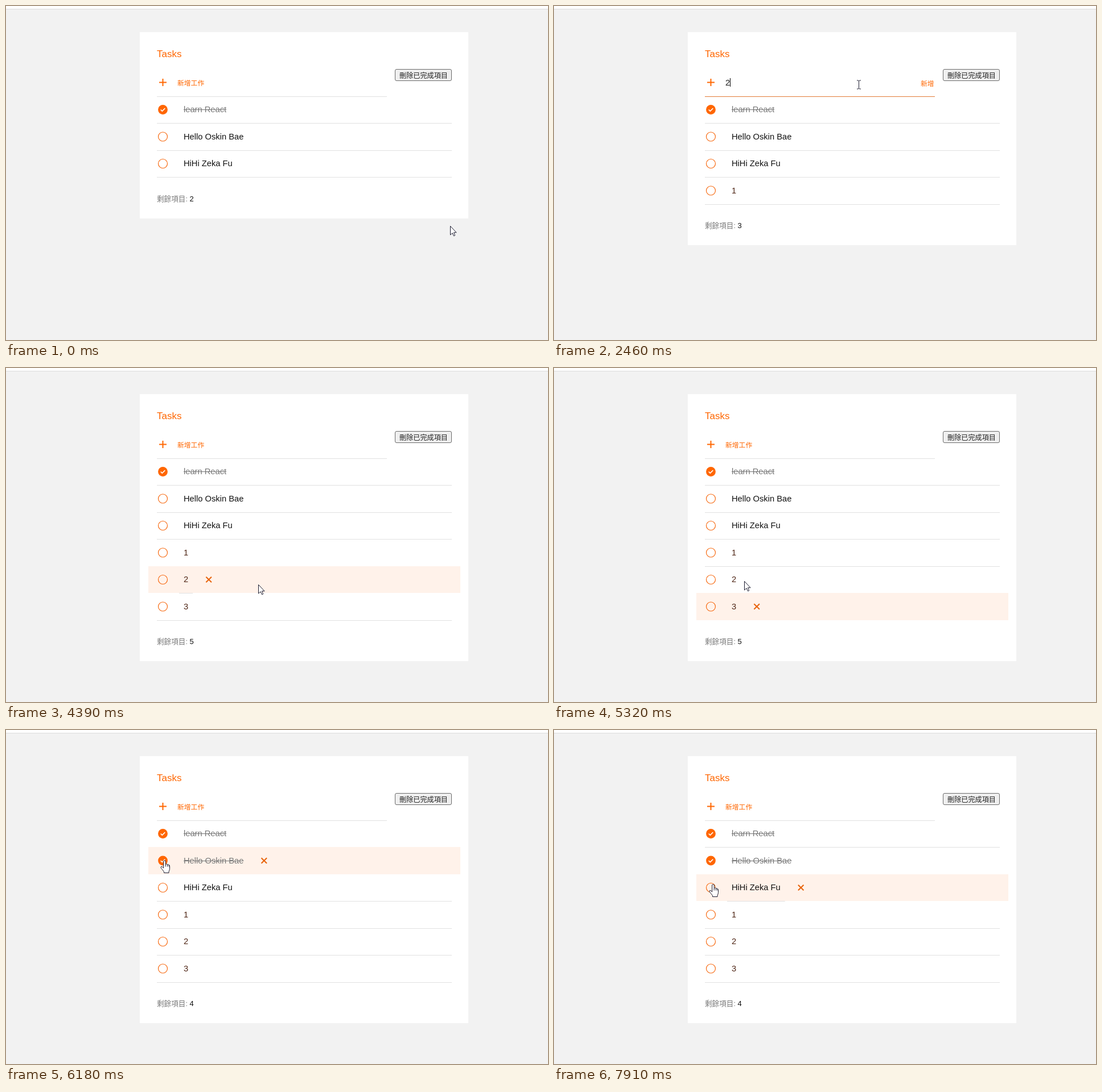
An HTML page with a canvas for the animation above (7.99 s loop, 952 px wide and 588 px high).

```html
<!DOCTYPE html>
<html lang="zh-Hant">
<head>
<meta charset="utf-8">
<title>Tasks</title>
<style>
html, body { margin: 0; width: 100%; height: 100%; overflow: hidden; background: #f2f2f2; }
canvas { display: block; }
</style>
</head>
<body>
<canvas id="stage" width="952" height="588"></canvas>
<script>
const ctx = document.getElementById('stage').getContext('2d');
const LOOP = 7990, ROW = 47.5, LIST_TOP = 159;
const TRAVEL = 200, HOVER_LAG = 80, TYPE_DELAY = 220;
const ORANGE = '#ff6600', LINE = '#e1e1e1';
const FONT = '"Liberation Sans", "Noto Sans CJK TC", "Noto Sans CJK", sans-serif';

// Times: the input gets focus, the task is added, the task is ticked off.
const tasks = [
  { label: 'learn React', added: 0, done: 0 },
  { label: 'Hello Oskin Bae', added: 0, done: 6100 },
  { label: 'HiHi Zeka Fu', added: 0 },
  { label: '1', focus: 930, added: 1600 },
  { label: '2', focus: 2230, added: 2770 },
  { label: '3', focus: 3080, added: 4010 }
];

// Pointer stops: arrival time and place. It sets off TRAVEL ms before it arrives.
const field = [616, 138], addButton = [655, 138];
const stops = [
  [0, 780, 387], [280, 560, 270], [480, 295, 136],
  [1300, ...field], [1580, ...addButton], [2080, 535, 138],
  [2700, ...addButton], [3000, ...field], [3540, 683, 133], [3980, ...addButton],
  [4330, 443, 381], [4670, 375, 500], [4950, 345, 440], [5390, 328, 340],
  [5640, 324, 242], [5980, 278, 229], [6790, 329, 365], [6960, 338, 482], [7850, 279, 271]
];

const arrow = new Path2D('M0 0V15.5L3.6 12.2 6 17.3 8.2 16.4 6 11.3H10.6Z');
const hand = new Path2D('M-1.8 1.2Q0-.8 1.8 1.2V7Q4 5.4 5 7.4 7 6.4 7.6 8.4 9 8 9 10V15' +
  'Q8.6 18 7.5 19.5V22H-1V20Q-4 16-6.5 13-6.8 10.5-4.5 11L-1.8 13.5ZM1.8 7V11M5 7.4V11M7.6 8.4V11');
const beam = new Path2D('M-3.5-7.5H-1L0-6.5 1-7.5H3.5M0-6.5V6.5M-3.5 7.5H-1L0 6.5 1 7.5H3.5');

function pointerAt(t) {
  let [x, y] = stops[0].slice(1);
  stops.forEach(([arrive, toX, toY], i) => {
    if (i === 0) return;
    const leave = Math.max(arrive - TRAVEL, stops[i - 1][0]);
    const k = Math.min(1, Math.max(0, (t - leave) / (arrive - leave)));
    x += (toX - x) * k;
    y += (toY - y) * k;
  });
  return [x, y];
}

const lineY = i => Math.floor(LIST_TOP + ROW * i);

function rect(x, y, w, h, color) {
  ctx.fillStyle = color;
  ctx.fillRect(x, y, w, h);
}

function text(str, x, y, size, color) {
  ctx.font = `${size}px ${FONT}`;
  ctx.fillStyle = color;
  ctx.fillText(str, x, y);
  return ctx.measureText(str).width;
}

function stroke(points, color, width) {
  ctx.beginPath();
  points.forEach(([x, y]) => ctx.lineTo(x, y));
  ctx.strokeStyle = color;
  ctx.lineWidth = width;
  ctx.stroke();
}

function checkbox(x, y, done) {
  ctx.beginPath();
  ctx.arc(x, y, done ? 8.4 : 8, 0, 7);
  if (done) {
    ctx.fillStyle = ORANGE;
    ctx.fill();
    stroke([[x - 3.8, y], [x - 1.2, y + 2.6], [x + 3.8, y - 2.4]], '#fff', 1.5);
  } else {
    ctx.strokeStyle = '#f76a12';
    ctx.lineWidth = 1.2;
    ctx.stroke();
  }
}

function drawForm(t) {
  const entry = tasks.find(task => t >= task.focus && t < task.added);
  stroke([[269, 134.5], [282, 134.5]], ORANGE, 2);
  stroke([[275.5, 128], [275.5, 141]], ORANGE, 2);
  rect(265, LIST_TOP, 404, 1, entry ? '#e27a36' : LINE);
  if (entry) {
    const typed = t >= entry.focus + TYPE_DELAY ? entry.label : '';
    const width = text(typed, 301, 140, 14.7, '#222');
    rect(Math.round(301 + width), 127, 1, 15, '#000');
    text('新增', 644, 141, 11.8, ORANGE);
  } else {
    text('新增工作', 301, 140, 11.8, ORANGE);
  }
  ctx.beginPath();
  ctx.roundRect(683.5, 111.5, 99, 20, 2.5);
  ctx.fillStyle = '#efefef';
  ctx.fill();
  ctx.strokeStyle = '#6b6b6b';
  ctx.lineWidth = 1;
  ctx.stroke();
  text('刪除已完成項目', 691, 127, 12.15, '#222');
}

function drawTask({ label, done }, i, hovered, t) {
  const left = 312, top = lineY(i), bottom = lineY(i + 1), mid = 182.5 + ROW * i;
  const isDone = t >= done;
  if (hovered) rect(250, top, 548, bottom - top, '#fff2ea');
  else rect(265, bottom, 518, 1, LINE);
  checkbox(275.5, mid, isDone);
  const color = isDone ? '#777' : label.length > 1 ? '#111' : '#4f2616';
  const width = text(label, left, Math.floor(mid + 5.3), 14.7, color);
  if (isDone) rect(left, Math.floor(mid), width, 1, '#777');
  if (!hovered) return;
  // Even rows end on a half pixel, which leaves a hairline below the label.
  if (i % 2 === 0) rect(left - 8, bottom, width + 16, 1, LINE);
  const x = left + width + 36, r = 4.8;
  stroke([[x - r, mid - r], [x + r, mid + r]], '#e8640c', 2);
  stroke([[x + r, mid - r], [x - r, mid + r]], '#e8640c', 2);
}

function drawPointer(x, y, listBottom) {
  const inForm = y > 120 && y < 158;
  const onAdd = inForm && x > 641 && x < 669;
  const onCheck = x > 266 && x < 286 && y > LIST_TOP && y < listBottom;
  const inInput = inForm && x > 288 && x <= 641;
  const shape = onAdd || onCheck ? hand : inInput ? beam : arrow;
  ctx.save();
  ctx.translate(Math.round(x) + .5, Math.round(y) + .5);
  ctx.lineWidth = 1;
  ctx.strokeStyle = '#1c1c30';
  ctx.fillStyle = '#fff';
  if (shape !== beam) ctx.fill(shape);
  ctx.stroke(shape);
  ctx.restore();
}

function draw(t) {
  const shown = tasks.filter(task => t >= task.added);
  const left = shown.filter(task => !(t >= task.done)).length;
  const extra = (shown.length - 3) * ROW;
  const listBottom = lineY(shown.length);

  rect(0, 0, 952, 588, '#f2f2f2');
  rect(0, 0, 952, 5, '#fff');
  rect(0, 5, 952, 1, '#dcdcdc');
  rect(235, 46, 577, Math.round(327.5 + extra), '#fff');
  text('Tasks', 265, 90, 17, ORANGE);
  drawForm(t);

  // Rows start to react once the last task is in.
  const [hoverX, hoverY] = pointerAt(t - HOVER_LAG);
  const hovering = shown.length === tasks.length && hoverX > 250 && hoverX < 798 && hoverY < listBottom;
  const hoverRow = hovering ? Math.floor((hoverY - LIST_TOP) / ROW) : -1;
  shown.forEach((task, i) => drawTask(task, i, i === hoverRow, t));

  const footer = Math.floor(344 + extra);
  text('剩餘項目:', 265, footer, 12.6, '#777');
  text(left, 322.6, footer, 13, '#111');
  drawPointer(...pointerAt(t), listBottom);
}

function tick() {
  draw(performance.now() % LOOP);
  requestAnimationFrame(tick);
}
tick();
</script>
</body>
</html>
```
